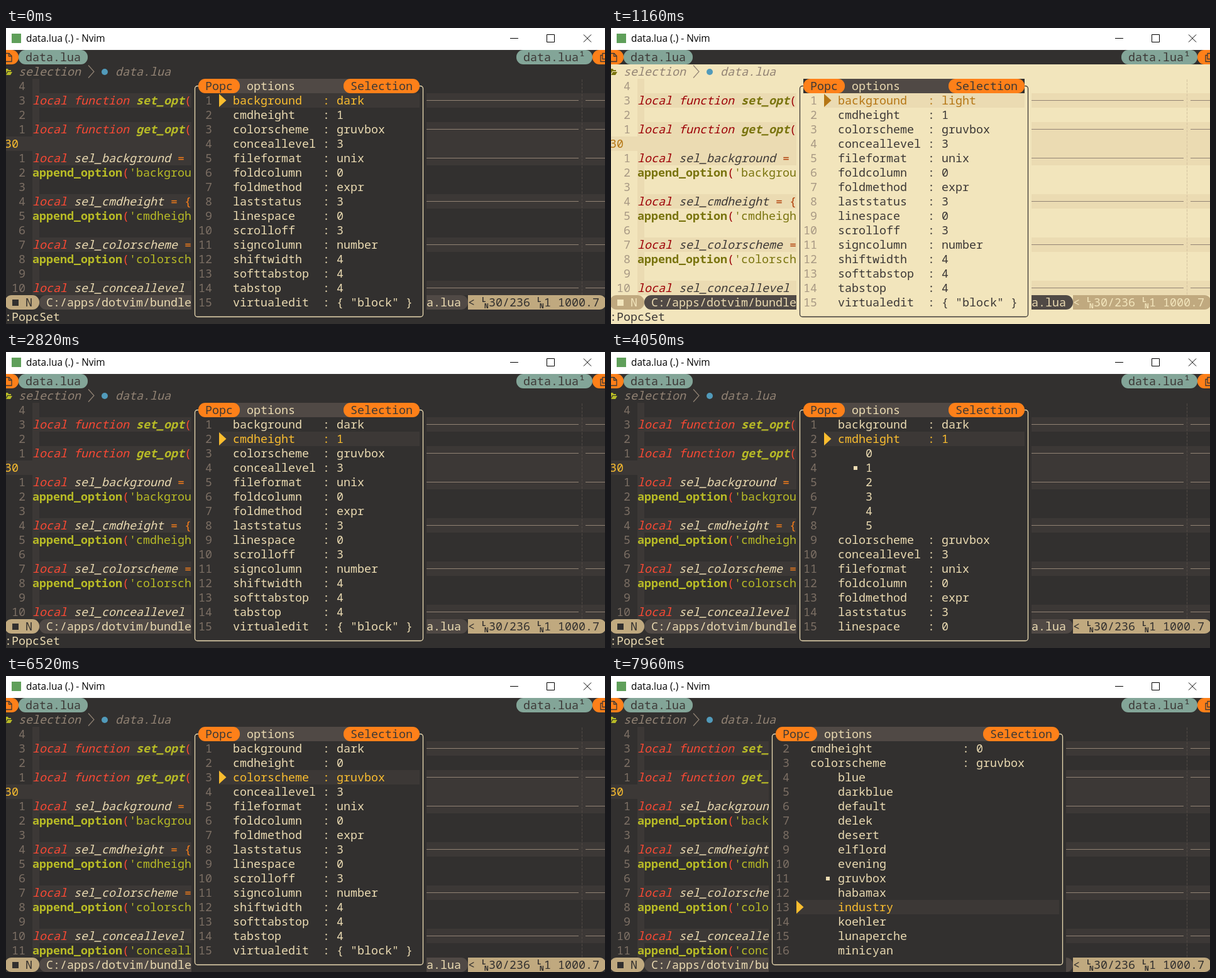
An HTML page with a canvas that plays this animation: 953x472 px, repeating every 8 s.

```html
<!DOCTYPE html>
<html lang="en">
<head>
<meta charset="utf-8">
<title>Option menu</title>
<style>
html, body { margin: 0; width: 953px; height: 472px; overflow: hidden; background: #32302f; }
canvas { display: block; }
</style>
</head>
<body>
<canvas id="stage" width="953" height="472"></canvas>
<script>
const ctx = document.getElementById('stage').getContext('2d');
const FONT = '18.333px "Noto Sans Mono", "DejaVu Sans Mono", monospace';
const W = 11, H = 23;
const X = col => col * W - 2;
const Y = row => 35 + row * H;

const dark = {
  bg: '#32302f', line: '#3c3836', fg: '#ebdbb2', red: '#fb4934', green: '#b8bb26',
  orange: '#fe8019', yellow: '#fabd2f', num: '#7c6f64', guide: '#504945',
  tan: '#c0a97f', tanText: '#32302f'
};
const light = {
  bg: '#f2e5bc', line: '#ebdbb2', fg: '#3c3836', red: '#9d0006', green: '#79740e',
  orange: '#af3a03', yellow: '#b57614', num: '#a89984', guide: '#d5c4a1',
  tan: '#c0a97f', tanText: '#f2e5bc'
};
const PLAIN_LIGHT = '#e0e2ea', GRAY = '#928374', BAR = '#504945', TEAL = '#83a598', ORANGE = '#fe8019';

// Buffer lines: spans of [text, colour, style]
const fn = name => [['local function ', 'red', 'italic'], [name, 'green', 'italic bold'], ['(', 'red']];
const sel = (name, end = '') =>
  [['local ', 'red', 'italic'], ['sel_' + name, 'fg', 'italic'], [' =' + end, 'orange']];
const add = name => [['append_option', 'green', 'bold'], ['(', 'red'], [`'${name}'`, 'green']];
const code = [
  [], fn('set_opt'), [], fn('get_opt'), [],
  sel('background'), add('background'), [],
  sel('cmdheight', ' {'), add('cmdheight'), [],
  sel('colorscheme'), add('colorscheme'), [],
  sel('conceallevel'), add('conceallevel')
];

const options = Object.entries({
  background: 'dark', cmdheight: '1', colorscheme: 'gruvbox', conceallevel: '3',
  fileformat: 'unix', foldcolumn: '0', foldmethod: 'expr', laststatus: '3',
  linespace: '0', scrolloff: '3', signcolumn: 'number', shiftwidth: '4',
  softtabstop: '4', tabstop: '4', virtualedit: '{ "block" }'
});
const choices = {
  cmdheight: [...'012345'],
  colorscheme: ('blue darkblue default delek desert elflord evening gruvbox ' +
    'habamax industry koehler lunaperche minicyan').split(' ')
};

function rect(x, y, w, h, color) {
  ctx.fillStyle = color;
  ctx.fillRect(x, y, w, h);
}
function cells(col, row, n, color) {
  rect(X(col), Y(row), n * W, H, color);
}
function text(str, col, row, color, style = '') {
  ctx.font = style + ' ' + FONT;
  ctx.fillStyle = color;
  ctx.fillText(str, X(col), Y(row) + 18);
}
function pill(col, row, n, color, left = 11, right = 11) {
  ctx.fillStyle = color;
  ctx.beginPath();
  ctx.roundRect(X(col), Y(row), n * W, H, [left, right, right, left]);
  ctx.fill();
}
function stroke(path, color, width = 1) {
  ctx.strokeStyle = color;
  ctx.lineWidth = width;
  ctx.stroke(new Path2D(path));
}
function fill(path, color) {
  ctx.fillStyle = color;
  ctx.fill(new Path2D(path));
}
function dot(x, y, r, color) {
  ctx.fillStyle = color;
  ctx.beginPath();
  ctx.arc(x, y, r, 0, 7);
  ctx.fill();
}

function titleBar() {
  rect(0, 0, 953, 35, '#fff');
  rect(9, 9, 15, 15, '#5f9f5a');
  ctx.font = '15.4px "Open Sans", sans-serif';
  ctx.fillStyle = '#000';
  ctx.fillText('data.lua (.) - Nvim', 32, 22);
  stroke('M802 16.5h13M860.5 10.5h12v12h-12zM919 10.5l12 12M931 10.5l-12 12', '#000');
}

function tabLine() {
  rect(0, 35, 953, H, dark.bg);
  pill(0, 0, 2, ORANGE, 0);
  stroke('M-1 40.5h6l4 4v9h-10M4.5 40.5v4.5h4', '#3c3836', 1.3);
  pill(2, 0, 10, TEAL);
  text('data.lua', 3, 0, '#3c3836');
  pill(74, 0, 11, TEAL);
  text('data.lua¹', 75, 0, '#3c3836');
  pill(85, 0, 3, ORANGE, 11, 0);
  stroke('M954 40.5h-5v9h5M949 43.5h-3v10h8', '#3c3836', 1.3);
}

function winBar(c) {
  rect(0, 58, 953, H, c.bg);
  fill('M0 65h3l1 2h4v2H2l-2 4zM3 70h7l-3 5H0z', c.green);
  text('selection', 2, 1, GRAY, 'italic');
  stroke('M131 59.5l9 10l-9 10', GRAY, 1.2);
  dot(157, 70, 5, '#519aba');
  text('data.lua', 16, 1, GRAY, 'italic');
}

function buffer(c, rows, plain) {
  for (let i = 0; i < rows; i++) {
    const row = i + 2, y = Y(row), spans = code[i];
    const current = i === 4, folded = spans.length && spans[0][1] === 'red';
    if (current) cells(0, row, 88, c.line);
    else {
      cells(0, row, 88, plain);
      cells(4, row, folded ? 84 : 1, c.line);
    }
    if (current) text('30', 0, row, c.yellow);
    else text(String(Math.abs(i - 4)).padStart(3), 0, row, c.num);

    let col = 4;
    for (const [str, color, style] of spans) {
      text(str, col, row, c[color], style);
      col += str.length;
    }
    if (folded) {
      rect(X(61), y + 11, 22 * W, 1, GRAY);
      rect(X(84), y + 11, 4 * W, 1, GRAY);
    }
    for (let k = 0; k < 4; k++) rect(916, y + 1 + k * 5.75, 1, 4, c.guide);
  }
}

function statusLine(c, row) {
  const y = Y(row);
  rect(0, y, 953, H, c.bg);
  pill(0, row, 5, c.tan);
  rect(10, y + 7, 10, 10, c.tanText);
  text('N', 3, row, c.tanText);
  pill(5, row, 62, BAR);
  text('C:/apps/dotvim/bundle', 6, row, dark.fg);
  text('a.lua', 61, row, dark.fg);
  pill(67, row, 20, c.tan, 0);
  text('<', 67, row, c.tanText);
  text('30/236', 70, row, c.tanText);
  text('1 1000.7', 78, row, c.tanText);
  for (const col of [69, 77]) {
    ctx.font = 'bold 11px "Noto Sans Mono", monospace';
    ctx.fillText('L', X(col), y + 11);
    ctx.fillText('N', X(col) + 4, y + 21);
  }
}

function popup(c, s) {
  const left = s.wide ? 23 : 27, right = s.wide ? 65 : 60;
  const nameCol = left + 6, colon = nameCol + (s.wide ? 22 : 13);
  const x0 = X(left) + 5.5, x1 = X(right) + 5.5;
  cells(left, 2, right - left + 1, c.bg);
  rect(X(left), Y(2), (right - left + 1) * W, 17 * H, c.bg);
  ctx.strokeStyle = c.fg;
  ctx.lineWidth = 1.3;
  ctx.beginPath();
  ctx.roundRect(x0, 92.5, x1 - x0, 368, 4);
  ctx.stroke();

  cells(left + 1, 2, right - left - 1, dark.bg);
  cells(left + 6, 2, right - left - 16, BAR);
  pill(left + 1, 2, 6, ORANGE);
  text('Popc', left + 2, 2, '#3c3836');
  text('options', left + 8, 2, dark.fg);
  pill(right - 11, 2, 11, ORANGE);
  text('Selection', right - 10, 2, '#3c3836');

  const values = { background: s.light ? 'light' : 'dark', cmdheight: s.cmdheight };
  const items = [];
  for (const [name, initial] of options) {
    const value = values[name] ?? initial;
    items.push({ name, value });
    if (name === s.open)
      for (const choice of choices[name]) items.push({ choice, on: choice === value });
  }

  for (let i = 0; i < 15; i++) {
    const n = s.top + i, row = 3 + i, y = Y(row);
    const item = items[n - 1], active = n === s.cursor;
    const color = active ? c.yellow : c.fg;
    if (active) {
      cells(left + 4, row, right - left - 4, c.line);
      const x = X(left + 4);
      fill(`M${x} ${y + 1}l11.5 10.5l-11.5 10.5z`, color);
    }
    text(String(n).padStart(2), left + 1, row, c.num);
    if (item.name) {
      text(item.name, nameCol, row, color);
      text(': ' + item.value, colon, row, color);
    } else {
      text(item.choice, nameCol + 4, row, color);
      if (item.on) rect(X(nameCol + 2) + 3, y + 9, 6, 6, color);
    }
  }
}

// Last value whose start time has passed
const at = (t, steps) => steps.filter(([start]) => t >= start).pop()[1];

function stateAt(t) {
  let cursor = at(t, [[0, 1], [2820, 2], [4410, 3], [5990, 2], [6520, 3], [7230, 4]]);
  if (t >= 7740) {
    const step = 1 + Math.min(7, Math.floor((t - 7740) * 7 / 220));
    cursor += Math.round(step * 9 / 8);
  }
  return {
    cursor,
    top: Math.max(1, cursor - 11),
    half: t >= 1130 && t < 1160,
    light: t >= 1160 && t < 1930,
    cmdheight: t < 5020 ? '1' : '0',
    open: at(t, [[0, ''], [4050, 'cmdheight'], [6220, ''], [6930, 'colorscheme']]),
    wide: t >= 6930
  };
}

function draw(now) {
  const s = stateAt(now % 8000);
  const c = s.light ? light : dark;
  const plain = s.half ? PLAIN_LIGHT : c.bg;
  const rows = s.cmdheight === '1' ? 15 : 16;
  titleBar();
  tabLine();
  winBar(c);
  buffer(c, rows, plain);
  statusLine(c, rows + 2);
  if (rows === 15) {
    cells(0, 18, 88, plain);
    if (s.half) cells(0, 18, 1, '#14161b');
    text(':', 0, 18, c.fg);
    text('PopcSet', 1, 18, s.half ? '#14161b' : c.fg);
  }
  popup(c, s);
  requestAnimationFrame(draw);
}
requestAnimationFrame(draw);
</script>
</body>
</html>
```
